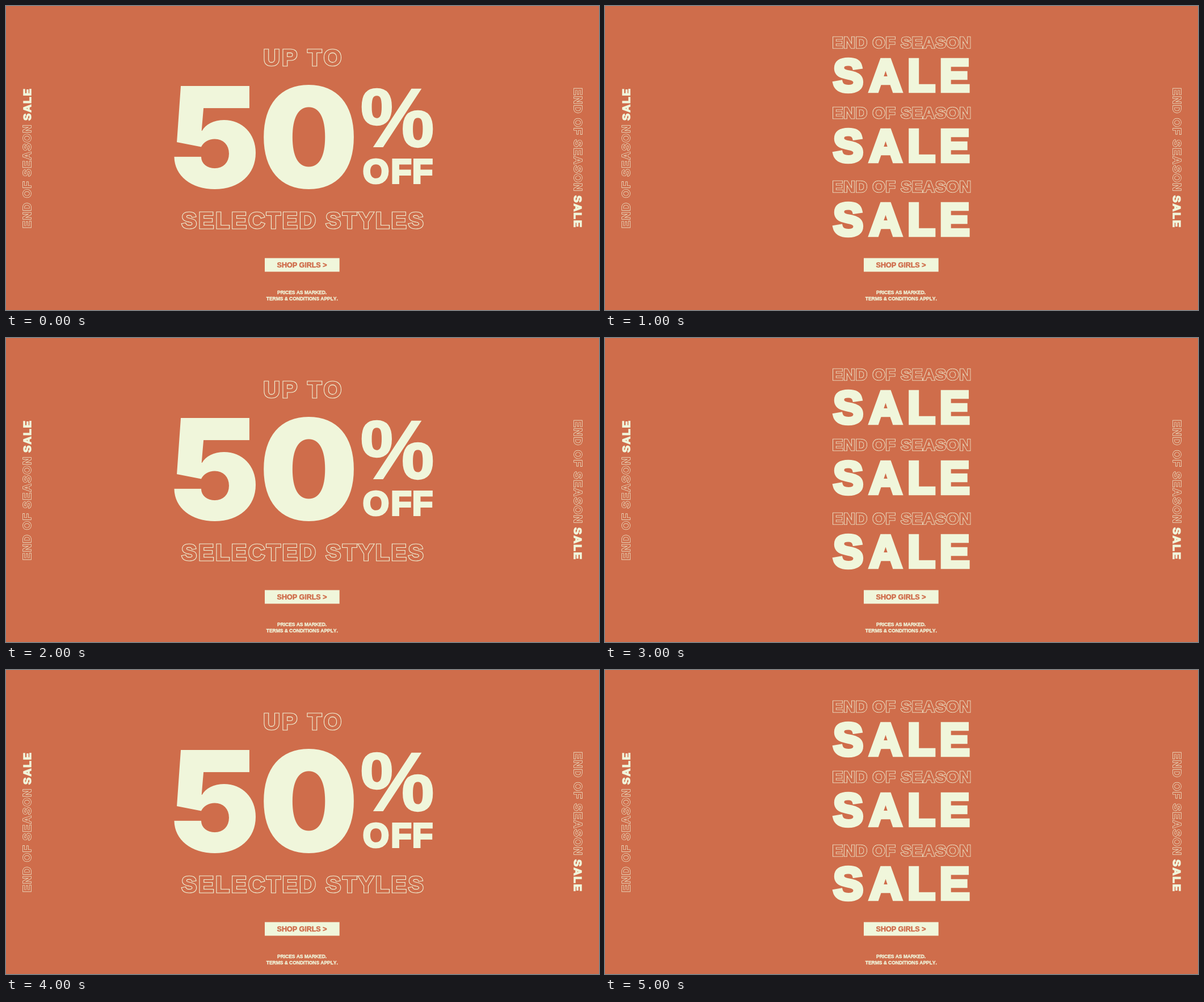
These frames come from a looping animation (1045 by 536 pixels, 6 s). An HTML page:

```html
<!DOCTYPE html>
<html lang="en">
<head>
<meta charset="utf-8">
<title>End of season sale</title>
<style>
  :root { --bg: #cf6d4b; --ink: #f0f6db; }
  html, body { margin: 0; width: 100%; height: 100%; overflow: hidden; background: var(--bg); }
  svg { display: block; width: 1045px; height: 536px; }

  text {
    font-family: "Liberation Sans", Arial, sans-serif;
    font-weight: 700;
    font-kerning: none;
    white-space: pre;
  }
  .mid { text-anchor: middle; }

  /* Solid lettering, thickened by a stroke of its own colour */
  .solid { fill: var(--ink); stroke: var(--ink); }
  .cta { fill: var(--bg); stroke: var(--bg); }

  /* Outlined lettering: a cream rim below, a slimmer background body on top */
  .outline { stroke-width: calc(var(--bold) + var(--edge)); }
  .rim { fill: var(--ink); stroke: var(--ink); --edge: var(--line); }
  .body { fill: var(--bg); stroke: var(--bg); --edge: calc(0px - var(--line)); }

  .digits {
    font: 900 247px Inter, sans-serif;
    font-optical-sizing: none;
    stroke: none;
  }

  .scene { animation: swap 2s step-end infinite; }
  .second { animation-delay: -1s; }
  @keyframes swap {
    0% { visibility: visible; }
    50%, 100% { visibility: hidden; }
  }
</style>
</head>
<body>
<svg viewBox="0 0 1045 536">
  <defs>
    <text id="up" class="outline" x="453.6" y="105" font-size="40.5" letter-spacing="3.45">UP TO</text>
    <text id="styles" class="outline" x="309.2" y="392.3" font-size="40.5" letter-spacing="2.98">SELECTED STYLES</text>
    <text id="season" class="outline" x="400.5" y="73.6" font-size="28.5" letter-spacing=".72">END OF SEASON</text>
    <text id="sideSeason" class="outline" x="-.7" y="-.5" font-size="19.5" letter-spacing="1.72">END OF SEASON</text>

    <g id="block">
      <g style="--bold: 1.6px; --line: .8px">
        <use href="#season" class="rim"/>
        <use href="#season" class="body"/>
      </g>
      <text class="solid mid" x="428.5 494.5 557.5 616" y="149.7" font-size="79" stroke-width="6.6">SALE</text>
    </g>

    <g id="side" style="--bold: .8px; --line: .65px">
      <use href="#sideSeason" class="rim"/>
      <use href="#sideSeason" class="body"/>
      <text class="solid" x="189" y="-.7" font-size="18.8" letter-spacing="2" stroke-width="1.5">SALE</text>
    </g>
  </defs>

  <rect width="1045" height="536" fill="var(--bg)"/>

  <use href="#side" transform="translate(44.2 391) rotate(-90)"/>
  <use href="#side" transform="translate(1000.3 145) rotate(90)"/>

  <g class="scene">
    <g style="--bold: 2px; --line: 1.1px">
      <use href="#up" class="rim"/>
      <use href="#up" class="body"/>
      <use href="#styles" class="rim"/>
      <use href="#styles" class="body"/>
    </g>
    <text class="solid mid digits" x="368.5 533.5" y="320.5">50</text>
    <text class="solid mid" x="689.5" y="248" font-size="147" stroke-width="2.4">%</text>
    <text class="solid mid" x="652 696.5 734" y="312.3" font-size="59" stroke-width="4">OFF</text>
  </g>

  <g class="scene second">
    <use href="#block"/>
    <use href="#block" y="124.2"/>
    <use href="#block" y="254.3"/>
  </g>

  <rect x="456" y="444.5" width="131.7" height="24" fill="var(--ink)"/>
  <text class="cta mid" x="521.5" y="460.9" font-size="12.5" stroke-width=".5">SHOP GIRLS &gt;</text>

  <g class="solid mid" font-size="8.6" letter-spacing="-.1" stroke-width=".35">
    <text x="521.6" y="508">PRICES AS MARKED.</text>
    <text x="521.8" y="518.5">TERMS &amp; CONDITIONS APPLY.</text>
  </g>
</svg>
</body>
</html>
```
